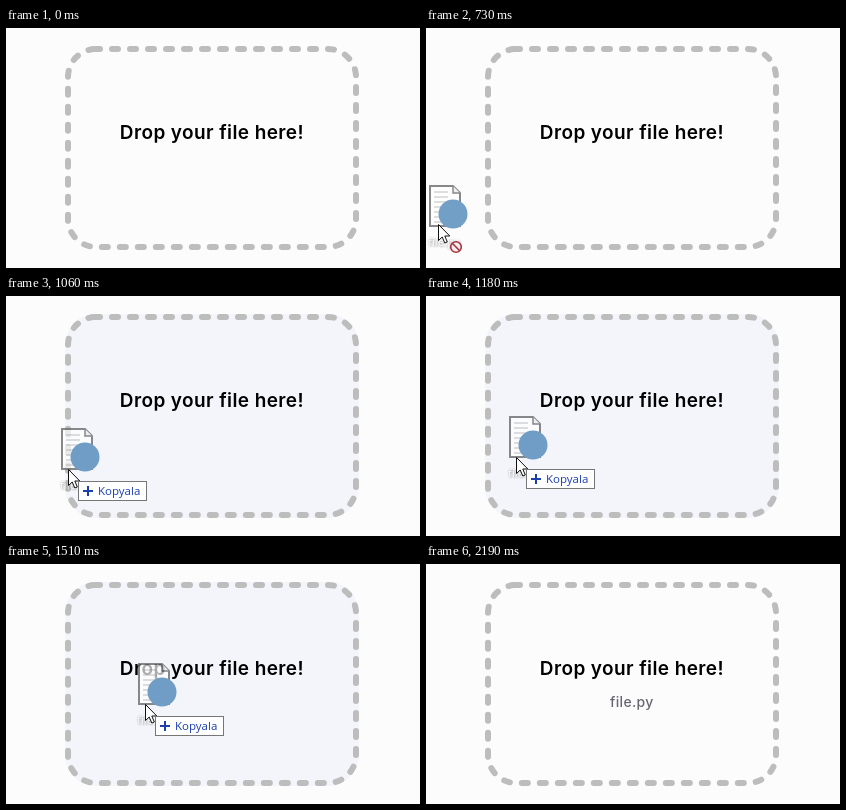
Recreate the animation shown at these times as an HTML page. Size 414 px wide and 240 px high, loop 4.32 s.

```html
<!DOCTYPE html>
<html lang="en">
<head>
<meta charset="utf-8">
<title>File drop zone</title>
<style>
  html, body { margin: 0; width: 100%; height: 100%; overflow: hidden; background: #fcfcfc; }
  svg { display: block; width: 414px; height: 240px; }
  text { font-family: Inter, "Open Sans", sans-serif; }
  .title { font-size: 19px; font-weight: 600; letter-spacing: .4px; text-anchor: middle; }
  .name { font-size: 14px; font-weight: 500; letter-spacing: .3px; fill: #666670; text-anchor: middle; }
  .tip { font: 11.5px "Open Sans", "Noto Sans", sans-serif; fill: #1c3fae; }
  .label { font: 11.5px "Open Sans", sans-serif; fill: #fff; text-shadow: 0 0 2px #888, 1px 1px 2px #999; }
</style>
</head>
<body>
<svg viewBox="0 0 414 240">
  <rect id="zone" x="59" y="18" width="294" height="204" rx="31" fill="#f3f5fb"/>
  <rect x="62" y="21" width="288" height="198" rx="28" fill="none" stroke="#bdbdbd"
        stroke-width="6" stroke-linecap="round" stroke-dasharray="6 12" stroke-dashoffset="2"/>
  <text class="title" x="205.9" y="111">Drop your file here!</text>
  <text class="name" id="name" x="205.8" y="143">file.py</text>

  <g id="ghost">
    <g opacity=".8">
      <path d="M-6-40H17L24-33V0H-6Z" fill="#fff" fill-opacity=".85" stroke="#6c6c70" stroke-width="2"/>
      <path d="M17-40V-33H24" fill="#eee" stroke="#6c6c70" stroke-width="1.5"/>
      <path id="lines" stroke="#c9c9c9" stroke-width="1.5"/>
      <circle cx="17" cy="-12" r="14.5" fill="#5088b8"/>
    </g>
    <text class="label" x="-8" y="20" opacity=".7">file.py</text>
  </g>

  <g id="deny" fill="none" stroke="#a8323c" stroke-width="1.6">
    <circle cx="20" cy="21" r="5.3" fill="#f4eeee"/>
    <path d="M16.3 17.3L23.7 24.7"/>
  </g>

  <path id="arrow" d="M.5.5V16.5L4.2 13L6.8 19L9.3 18L6.8 12H11.8Z"
        fill="#fff" stroke="#111" stroke-width="1"/>

  <g id="copy">
    <rect x="10.5" y="12.5" width="68" height="19" fill="#fff" stroke="#767676"/>
    <path d="M15 22H25M20 17V27" stroke="#1c3fae" stroke-width="2"/>
    <text class="tip" x="30" y="26">Kopyala</text>
  </g>
</svg>
<script>
  const LOOP = 4320, START = 290, ENTER = 1060, DROP = 1940, LEAVE = 2120, GONE = 2190;
  const STEP = 65, ORIGIN = 265; // the pointer is redrawn once per STEP
  const path = [ // time, x, y
    [265, -28, 222], [395, -20, 213], [850, 22, 192],
    [1045, 62, 173], [1370, 131, 142], [1500, 139, 140]
  ];
  const el = id => document.getElementById(id);
  const show = (id, on) => el(id).style.display = on ? "" : "none";
  const move = (id, x, y) => el(id).setAttribute("transform", `translate(${x} ${y})`);

  let lines = "";
  for (let y = -34; y < 0; y += 5) lines += `M-2 ${y}H${y < -28 ? 12 : 20}`;
  el("lines").setAttribute("d", lines);

  function pointer(t) {
    if (t >= DROP) return [138, t < LEAVE ? 139 : 159];
    const tick = ORIGIN + Math.floor((t - ORIGIN) / STEP) * STEP;
    const next = path.findIndex(key => key[0] > tick);
    if (next < 0) return path.at(-1).slice(1);
    const a = path[next - 1], b = path[next];
    const k = (tick - a[0]) / (b[0] - a[0]);
    return [1, 2].map(i => Math.round(a[i] + (b[i] - a[i]) * k));
  }

  function draw(t) {
    const dragging = t >= START && t < DROP;
    const over = dragging && t >= ENTER;
    const denied = dragging && !over;
    show("zone", over);
    show("name", t >= DROP);
    show("ghost", dragging);
    show("deny", denied);
    show("copy", over);
    show("arrow", t >= START && t < GONE);
    if (t < START) return;
    const [x, y] = pointer(t);
    for (const id of ["ghost", "deny", "copy"]) move(id, x, y);
    move("arrow", denied ? x + 2 : x, denied ? y - 2 : y);
  }

  const start = performance.now();
  function tick() {
    draw((performance.now() - start) % LOOP);
    requestAnimationFrame(tick);
  }
  tick();
</script>
</body>
</html>
```
